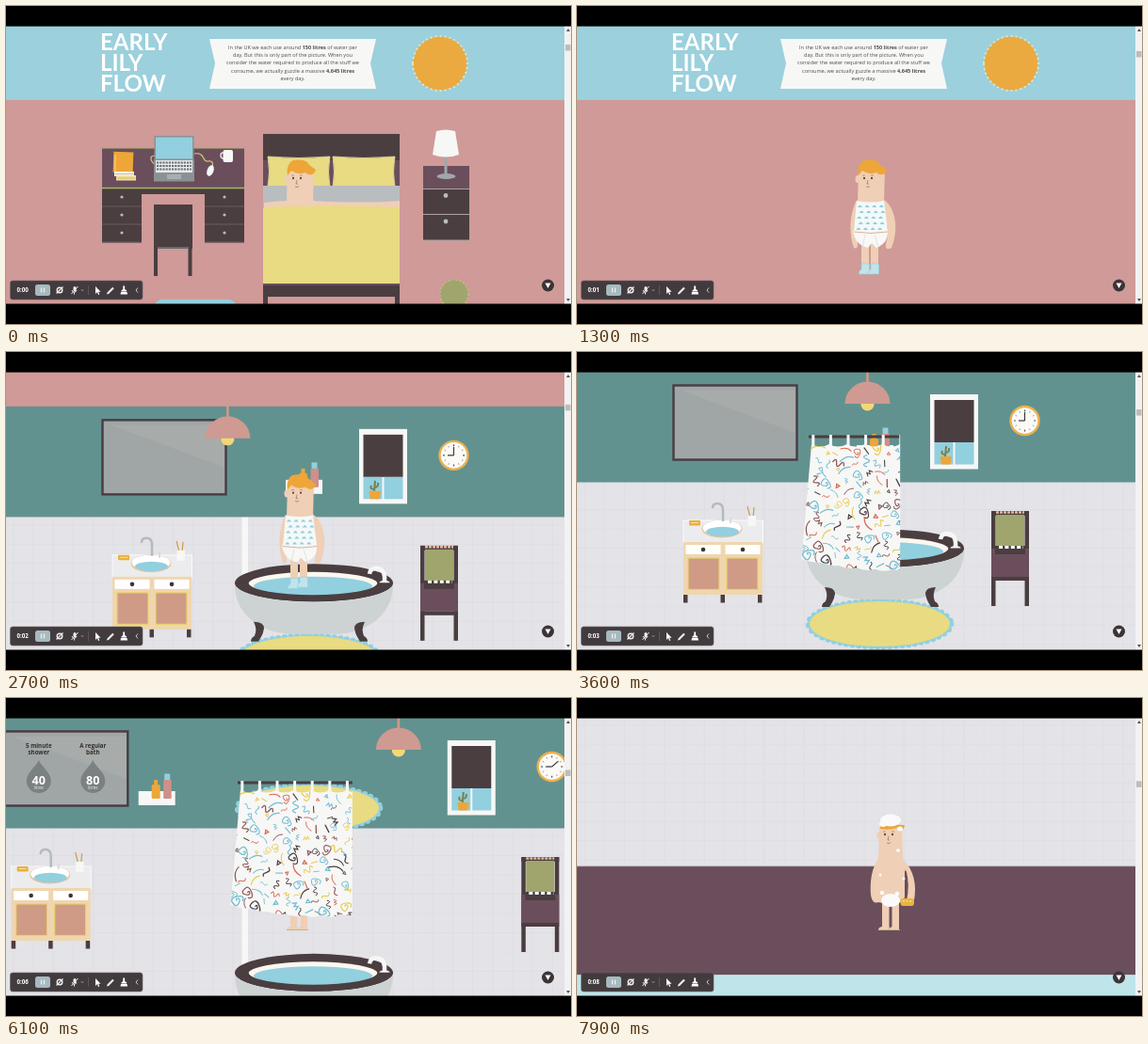
Write an HTML page that moves like this. It is 600 px wide and 338 px high and loops after 8000 ms.

```html
<!DOCTYPE html>
<html lang="en">
<head>
<meta charset="utf-8">
<title>Water story scroll</title>
<style>
html, body { margin: 0; width: 100%; height: 100%; overflow: hidden; background: #000; }
svg { display: block; width: 100vw; height: 100vh; }
text { font-family: "Open Sans", "Noto Sans", sans-serif; }
.logo { font: 700 24px Lato, sans-serif; fill: #fff; }
.mid { text-anchor: middle; }
.bold { font-weight: 700; }
</style>
</head>
<body>
<svg id="stage" viewBox="0 0 600 338" xmlns="http://www.w3.org/2000/svg"></svg>
<script>
const LOOP = 8000, ROOM = 296, SPEED = 0.19;
const C = {
  sky: '#9bd0dc', pink: '#cf9a98', teal: '#62928f', tile: '#e3e3e8', plum: '#6b4e5b', dark: '#4a3e40',
  yellow: '#e8db82', skin: '#efcfb5', hair: '#eda637', white: '#f7f7f6', grey: '#b9bdbf', green: '#a0a56d',
  blue: '#92cfdf', ice: '#bfe4ea', lime: '#a9b46a', peach: '#cf9b87', tub: '#cdd3d3'
};

const clamp = (v, lo, hi) => Math.max(lo, Math.min(hi, v));
const rect = (x, y, w, h, fill, more = '') =>
  `<rect x="${x}" y="${y}" width="${w}" height="${h}" fill="${fill}" ${more}/>`;
const oval = (x, y, rx, ry, fill, more = '') =>
  `<ellipse cx="${x}" cy="${y}" rx="${rx}" ry="${ry}" fill="${fill}" ${more}/>`;
const shape = (d, fill, more = '') => `<path d="${d}" fill="${fill}" ${more}/>`;
const line = (d, color, width = 1, more = '') =>
  `<path d="${d}" fill="none" stroke="${color}" stroke-width="${width}" ${more}/>`;
const text = (x, y, size, fill, str, cls = '') =>
  `<text x="${x}" y="${y}" font-size="${size}" fill="${fill}" class="${cls}">${str}</text>`;
const group = (id, ...parts) => `<g id="${id}">${parts.join('')}</g>`;
const room = (index, ...parts) => `<g transform="translate(0 ${index * ROOM})">${parts.join('')}</g>`;
const repeat = (n, fn) => Array.from({ length: n }, (_, i) => fn(i)).join('');

function seeded(seed) {
  return () => (seed = (seed * 16807) % 2147483647) / 2147483647;
}

// Bedroom
function header() {
  const copy = ['In the UK we each use around <tspan class="bold">150 litres</tspan> of water per',
    'day. But this is only part of the picture. When you',
    'consider the water required to produce all the stuff we',
    'consume, we actually guzzle a massive <tspan class="bold">4,645 litres</tspan>', 'every day.'];
  return rect(0, 20, 593, 80, C.sky) +
    ['EARLY', 'LILY', 'FLOW'].map((w, i) => `<text x="100" y="${47 + i * 22}" class="logo">${w}</text>`).join('') +
    shape('M216 35H393L387 61 393 88H216L222 61Z', C.white) +
    copy.map((s, i) => text(304.5, 46 + i * 8.2, 5.55, '#4d4d4d', s, 'mid')).join('') +
    oval(461, 61, 28.5, 28.5, '#eaaa40') +
    line('M432 61a29 29 0 1 0 58 0a29 29 0 1 0-58 0', '#f3e3b5', 1.8, 'stroke-dasharray="2 3"');
}

function drawers(x) {
  return rect(x, 195, 42, 56.5, C.dark) +
    [213, 232, 251].map(y => line(`M${x} ${y}h42`, '#74636a', 0.8)).join('') +
    [203, 222, 241].map(y => oval(x + 21, y, 1.6, 1.6, C.grey)).join('');
}

function desk() {
  return group('desk',
    rect(102, 151, 151, 42, C.plum), line('M102 151H253', C.lime, 1.2),
    rect(102, 193, 151, 7, C.dark), line('M102 193.5H253', C.lime, 1.5),
    drawers(102), drawers(211),
    rect(157, 211, 41, 47, C.dark), rect(157, 250, 4, 37, C.dark), rect(193.5, 250, 4, 37, C.dark),
    line('M161 257H194', '#8fb3ba', 0.8),
    rect(114, 155, 21, 22, C.hair, 'transform="rotate(2 124 166)"'), line('M116 158v18', '#f5d58b', 1),
    rect(115, 176, 21, 5, C.white), rect(117, 180, 21, 5.5, '#f0dfa0'), line('M116 178.5h20M118 183h19', '#c9a44b', 0.7),
    rect(157.5, 138, 42, 26, '#8b9296'), rect(159, 139.5, 39, 23, C.blue),
    rect(157, 163, 43, 23.5, '#8b9296'), rect(159, 164, 39, 13, '#e7e9ea'),
    line('M160 166.5h37M160 170h37M160 173.5h37', '#667075', 2, 'stroke-dasharray="2.2 1"'),
    rect(171, 179, 15, 5, '#a8afb2'),
    line('M200 157c12-2 8 9 14 8s6 2 5 6M158 159c-8 0-2 9-1 8', '#d8c877', 1.2),
    oval(217, 175, 3.4, 6, C.white, 'transform="rotate(20 217 175)"'),
    rect(230.5, 153, 10.5, 13, C.white, 'rx="2"'), line('M231 156c-4-1-4 6 0 6', C.white, 1.3),
    shape('M158 317q4-6 10-5h68q5 0 8 5z', C.blue));
}

function nightstand() {
  return group('stand',
    rect(443, 170, 49, 24, C.plum), rect(443, 194, 49, 55, C.dark),
    line('M443 194.5h49M443 221.5h49M443 249h49', '#a9a3a5', 1.2),
    oval(467, 201.5, 2.4, 2.4, C.grey), oval(467, 229, 2.4, 2.4, C.grey),
    rect(465.5, 158, 3, 22, '#a0a7ab'), oval(467.5, 181, 10, 3, '#a0a7ab'),
    shape('M457 133q10-3 20 0l4 25q-14 5-28 0z', C.white),
    oval(476, 306, 15, 15, C.green, 'stroke="#c4bf8c" stroke-width="1.3" stroke-dasharray="2 2"'));
}

const bedBack = () => group('bedBack',
  rect(273, 136, 145, 57, C.plum), rect(273, 136, 145, 28, C.dark),
  [278, 347].map(x => shape(`M${x} 160q33 3 66 0q-3 16 0 32q-33 2-66 0q3-16 0-32`, C.yellow,
    'stroke="#f0e9b5" stroke-width=".7"')).join(''),
  rect(273, 191, 145, 22, C.grey));

const bedFront = () => group('bedFront',
  shape('M274 209q25-3 50-2q60 3 94 0v9H274z', C.skin),
  shape('M273 214q70-3 145 0v82H273z', C.yellow),
  rect(273, 295, 145, 3, C.plum), rect(273, 297, 145, 12, C.dark),
  rect(273, 309, 5, 12, C.dark), rect(413, 309, 5, 12, C.dark));

// Bathroom
function mirror() {
  const drop = (x, n) => shape(`M${x} 66c2 6 13 13 13 22a13 13 0 0 1-26 0c0-9 11-16 13-22`, '#7b8183') +
    text(x, 91.5, 12.6, '#fff', n, 'mid bold') + text(x, 97, 4.6, '#eee', 'litres', 'mid');
  const label = (x, a, b) => text(x, 53, 6.2, '#33302f', a, 'mid bold') + text(x, 60, 6.2, '#33302f', b, 'mid bold');
  return group('mirror',
    rect(102.5, 35.5, 131, 79, '#a0a6a6', 'stroke="#493b44" stroke-width="2.4"'),
    shape('M112 41H232V86Z', '#a7abaa'),
    group('facts', label(139, '5 minute', 'shower'), label(196.5, 'A regular', 'bath'), drop(139, 40), drop(196.5, 80)));
}

const shelf = () => group('shelf',
  rect(297, 99, 39, 15, C.white),
  rect(311, 92, 9, 15, C.hair, 'rx="1.5"'), rect(313.5, 87, 4, 6, C.hair),
  rect(323.5, 87, 8.5, 20, '#cf8f8a', 'rx="1"'), rect(324.5, 80.5, 6, 6.5, C.blue));

const lamp = () => group('lamp',
  rect(-1.3, 20, 2.6, 15, C.peach), oval(0, 56, 7, 6.5, '#f3d777'),
  shape('M-24 55a24 23.5 0 0 1 48 0z', '#cf9a92'));

const windowPane = () => group('pane',
  rect(375, 45, 51, 79.5, C.white), rect(379.5, 51, 42, 45, C.dark),
  rect(379.5, 96, 20, 23.5, C.blue), rect(401.5, 96, 20, 23.5, C.blue),
  line('M391 111l1-11M391 107q5 0 4-5M391 109q-5 0-3-4', '#77804f', 2),
  shape('M385.5 111h12.5l-1.5 8.5h-9.5z', C.hair));

const clock = () => group('clock',
  oval(475.5, 73, 15, 15, '#fbfaf6', 'stroke="#edb04e" stroke-width="2.4"'),
  repeat(12, i => `<path d="M475.5 61.5v1.8" stroke="#444" stroke-width="${i % 3 ? 0.5 : 1.2}" transform="rotate(${i * 30} 475.5 73)"/>`),
  line('M475.5 73H469', '#333', 1.2), line('M475.5 73V64', '#333', 1.1, 'id="minute"'));

const sink = () => group('sink',
  rect(113, 179, 84.5, 24, '#ececef', 'stroke="#fafafa" stroke-width="1"'),
  oval(154, 188, 21.5, 9.5, '#e6c69d'), oval(154, 187, 20.5, 8.2, '#fff'), oval(154.5, 191, 17.5, 5.2, C.blue),
  line('M155 180V168q0-7-6-7-5 0-5 5', '#b3bbc0', 2.5), line('M163 176v6', '#d7dcdf', 2),
  rect(119, 179, 12, 5.5, '#e9b13f', 'rx="1"'), line('M121 181.5h8', '#fbe6a8', 0.9),
  line('M184 176l-3-12M187 176l1-11', '#d29c45', 1.2), rect(181.5, 174, 8.5, 11, C.white),
  rect(113, 202, 84, 56, '#f0d6ae'),
  [115.5, 157.5].map(x => rect(x, 205, 37, 10, '#fff') + oval(x + 18.5, 210, 2.3, 2.3, '#3c3435')).join(''),
  [118, 159].map(x => rect(x, 219, 33, 33.5, C.peach, 'stroke="#e8d36f" stroke-width="1.2"')).join(''),
  [113, 152.5, 192].map(x => rect(x, 258, 4.5, 8.5, C.dark)).join(''));

const chair = () => group('chair',
  rect(440, 169, 40, 5, C.dark), rect(440, 169, 4.5, 101, C.dark), rect(475.5, 169, 4.5, 101, C.dark),
  line('M445 170.5h30', '#e2b7a0', 2.5, 'stroke-dasharray="3 1"'), rect(445, 173, 30, 34, C.green),
  rect(440, 209, 40, 30, C.plum), rect(444, 206, 32, 9, C.dark),
  line('M448 207.5h26', '#fff', 3, 'stroke-dasharray="4 2.4"'), rect(440, 239, 40, 4, C.dark));

const rug = () => group('rug',
  oval(321.5, 289, 75.5, 24, C.yellow, `stroke="${C.blue}" stroke-width="6.5" stroke-dasharray="0 6.6" stroke-linecap="round"`),
  oval(321.5, 289, 74.5, 24, C.yellow));

const tubBack = () => group('tubBack',
  rect(250.5, 139, 6.5, 66, C.white), oval(254, 203, 5, 3, C.white),
  oval(327, 208.5, 84, 20, C.dark), oval(326, 209.5, 68.5, 12.5, '#fbf7ef'), oval(326, 212, 63, 10, C.blue),
  line('M402 208V202q-1-9-9-9-6 0-7 6', C.white, 4.5), oval(402, 208.5, 5.5, 2.5, C.white));

const tubFront = () => group('tubFront',
  shape('M243 209A84 20 0 0 0 411 209C412 244 380 263 350 263H304C274 263 242 244 243 209', C.tub),
  shape('M243 208.5A84 20 0 0 0 411 208.5H394.5A68.5 13 0 0 1 257.5 208.5Z', C.dark),
  shape('M263 250q11 0 11 7-1 6-3 9l-3 5h-8q0-4 4-6 3-7-1-15z', C.dark),
  shape('M381 250q-11 0-11 7 1 6 3 9l3 5h8q0-4-4-6-3-7 1-15z', C.dark));

function curtain() {
  const rnd = seeded(4711), colors = ['#4a3e40', '#74bdd2', '#e6cc55', '#d8694f', '#8b5a58', '#74bdd2'];
  const marks = ['M-5 1q2-6 4 0t4 0 4 0', 'M-6 4Q-2-5 6-5', 'M0 0q2-2 2 1t-5 1 0-6 7 4-4 6',
    'M-4 2l2-4 2 4 2-4 2 4', 'M-5-2c4-4 5 8 10 2', 'M-4 0h8', 'M-2-2l2 4 2-4z'];
  const pattern = repeat(17 * 12, i => {
    const x = 240 + (i % 17) * 10.8 + rnd() * 7, y = 102 + Math.floor(i / 17) * 11.3 + rnd() * 7;
    const d = marks[Math.floor(rnd() * marks.length)], color = colors[Math.floor(rnd() * colors.length)];
    const pose = `translate(${x.toFixed(1)} ${y.toFixed(1)}) rotate(${Math.round(rnd() * 180 - 90)}) scale(${(0.65 + rnd() * 0.4).toFixed(2)})`;
    return line(d, color, 1.25, `transform="${pose}" stroke-linecap="round"`);
  });
  const hem = repeat(9, i => {
    const x = 414 - (i + 1) * 19.5, y = 220 + 11 * Math.sin(Math.PI * (i + 1) / 9);
    return `Q${x + 10} ${(y + 4).toFixed(1)} ${x} ${y.toFixed(1)}`;
  });
  const cloth = 'M249 98' + repeat(8, () => 'q9.4 5 18.8 0') + 'L405 120L414 220' + hem + 'Z';
  return `<clipPath id="cloth"><path d="${cloth}"/></clipPath><g clip-path="url(#opening)">` +
    shape(cloth, C.white) + `<g clip-path="url(#cloth)">${pattern}</g>` +
    rect(246, 88.5, 157, 3, C.dark) + repeat(9, i => rect(249.3 + i * 18.6, 88, 3, 12, C.white)) + '</g>';
}

function tiles() {
  const grid = repeat(28, i => `M${8 + i * 21.2} 139V317`) + repeat(9, i => `M0 ${147 + i * 20.5}H593`);
  return rect(0, 138.5, 593, 178.5, C.tile) + line(grid, '#dddde2', 0.8);
}

// Character
const face = (x, y) => oval(x - 4, y, 0.9, 1.2, '#3d3433') + oval(x + 4, y, 0.9, 1.2, '#3d3433') +
  line(`M${x - 6} ${y - 3}h3M${x + 3} ${y - 3}h3`, '#c98c3b', 0.8) +
  line(`M${x} ${y + 2}l-1 4h2M${x - 2} ${y + 9}q2 1.5 4-.5`, '#a97763', 0.8);

function dressed() {
  const leg = (id, x) => group(id, rect(x, 250, 8, 28, C.skin),
    shape(`M${x} 274h8.5v11h-11q-1-3 2.5-5z`, C.ice, 'stroke="#93cfdd" stroke-width=".6"'));
  return group('dressed',
    leg('legA', 302), leg('legB', 312),
    shape('M297 206C290 220 288 240 294 257q4 2 4-4V210zM326 206C340 216 341 240 334 257q-7 4-6-4 5-14-2-30z', C.skin),
    shape('M299 173q14-8 28 0l-1 36h-28z', C.skin), oval(298, 184, 2.5, 4, C.skin),
    shape('M293 239h37q1 13-12 18l-5-5-4 5q-14-3-16-18', '#f8f8f7'), line('M303 256l3-13M320 256l-4-13', '#d5d8d8', 0.7),
    shape('M297 207q15 3 29 0l4 32q-18 4-36 1z', '#f5f8f8'),
    repeat(20, i => {
      const row = Math.floor(i / 4);
      return shape(`M${298 + (i % 4) * 7.6 + (row % 2) * 2 - row * 0.4} ${214 + row * 6}q2.5-5 5 0z`, C.blue);
    }),
    line('M294 240q18 3 36 0', '#dfb08f', 1),
    face(309, 183),
    shape('M299 180c-1-6 0-11 4-15 5-2 12-2 17 1l2 3 7 5-2 4q-5 3-9-1-8 3-15-2z', C.hair));
}

const washed = () => group('washed',
  rect(324, 212, 7.5, 34, C.skin), rect(334.5, 212, 7.5, 34, C.skin),
  shape('M320 247q0-4 5-4h6.5v4zM331.5 247q0-4 5-4h5.5v4z', C.skin), line('M320 246.5h23', '#b9bf7c', 1),
  shape('M321 136q12-5 24 0l1 35c12 12 15 28 12 44q-4 5-8 1 4-18-2-34v34q-14 5-28 1-10 4-8-22 1-14 8-24z', C.skin),
  line('M349 184q4 16-1 30', C.plum, 1.5),
  oval(320.5, 146, 2, 3.5, C.skin), face(331, 145),
  shape('M322 134l26 1-1 4q-4 2-7-1-9 3-18 1z', C.hair),
  oval(333, 130, 11, 6.5, '#fafafa'), oval(325, 134, 4, 3, '#fafafa'), oval(343, 139, 3, 2.5, '#fafafa'),
  oval(333, 215, 10, 7, '#fafafa'), oval(324, 207, 2.4, 2.2, '#fafafa'), oval(340, 208, 2.4, 2.2, '#fafafa'),
  oval(341, 162, 2, 1.8, '#fafafa'), oval(322, 188, 1.5, 1.5, '#fafafa'), oval(347, 192, 1.5, 1.5, '#fafafa'),
  rect(343.5, 213, 14.5, 8, '#e8b53f', 'rx="3"'), line('M346 216h9', '#f7dd8d', 1.5, 'stroke-dasharray="2 1.5"'));

// Fixed controls
function controls() {
  const icon = (d, w = 1.3) => line(d, '#eee', w);
  return rect(593, 20, 7, 298, '#f2f2f2') + shape('M595 27l2-3 2 3zM595 311l2 3 2-3z', '#555') +
    rect(594, 41, 5.5, 6.5, '#bcbcbc', 'id="thumb"') +
    oval(575.5, 297, 6.5, 6.5, '#3a3436') + shape('M572.5 294.5h6l-3 5.5z', '#fff') +
    rect(4.5, 292, 140.5, 20, '#423b3e', 'rx="2.5" stroke="#665d61" stroke-width=".6"') +
    '<text id="timer" x="11.5" y="304.3" font-size="6.2" fill="#fff" class="bold"></text>' +
    rect(31, 296, 16, 12, '#a6bac0', 'rx="2.5"') + icon('M37.5 299.5v5M40.5 299.5v5') +
    oval(57, 302, 2.8, 2.8, 'none', 'stroke="#eee" stroke-width="1.4"') + icon('M53.5 305.5l7-7') +
    rect(71.5, 298, 3, 5.5, '#eee', 'rx="1.5"') +
    icon('M70 302q2.5 5 5 0M72.5 304.5v2M69.5 306l7-8', 1) + icon('M80 301.5l1 1 1-1', 0.7) + line('M87.5 297v10', '#655d60', 0.8) +
    shape('M95 298v8l2-2 1 3 1.3-.6-1.2-2.7h2.5z', '#fff') +
    icon('M108.5 305l5.5-5.5', 2.2) + shape('M107 306.5l.8-2.5 1.7 1.7z', '#fff') +
    shape('M124.3 297.5h1.8v3.5l2 1.2v1.2h-5.6v-1.2l1.8-1.2zM122 304h6.5l.5 2.5h-7.5z', '#fff') + icon('M140 299.5l-2 2.5 2 2.5', 0.8);
}

document.getElementById('stage').innerHTML =
  `<clipPath id="view"><rect y="21" width="593" height="296"/></clipPath>
   <clipPath id="opening"><rect id="openingBox" x="230" y="80" height="160"/></clipPath>` +
  rect(0, 0, 600, 338, '#000') + '<g clip-path="url(#view)">' +
  group('back',
    room(0, rect(0, 20, 593, 298, C.pink), header(), desk(), nightstand(), bedBack()),
    room(1, rect(0, 21, 593, 118, C.teal), tiles(), mirror(), shelf(), lamp(), windowPane(), clock(), sink(), chair(), rug(), tubBack()),
    room(2, rect(0, 21, 593, 117, C.plum), rect(0, 137, 593, 180, C.ice), line('M0 21.5H593', '#eee', 0.8))) +
  group('person', dressed(), washed()) +
  group('front', room(0, bedFront()), room(1, tubFront(), curtain())) + '</g>' +
  controls() + rect(0, 0, 600, 21.6, '#000') + rect(0, 316.5, 600, 22, '#000');

const el = {};
document.querySelectorAll('[id]').forEach(node => { el[node.id] = node; });
const move = (id, x, y = 0) => el[id].setAttribute('transform', `translate(${x.toFixed(2)} ${y.toFixed(2)})`);

function render(t) {
  const scroll = clamp(SPEED * (t - 1337), 0, ROOM) + SPEED * Math.max(0, t - 7170);
  move('back', 0, -scroll);
  move('front', 0, -scroll);

  // Furniture parts to clear the bedroom
  const leave = 2.3e-4 * Math.max(0, t - 250) ** 2;
  move('desk', -leave);
  move('stand', leave);
  move('bedBack', 0, leave * 0.72);
  move('bedFront', 0, leave * 0.72);

  // Bathroom pieces drift apart after the shower
  const part = 0.2 * Math.max(0, t - 5580);
  move('mirror', -part);
  move('sink', -part * 1.03);
  move('shelf', -part * 1.5);
  move('lamp', Math.min(308.5, 14.5 + 0.3675 * (t - 2100)) + part * 1.04);
  move('pane', part * 0.9);
  move('clock', part);
  move('chair', part * 1.03);
  move('rug', 0, -part * 1.65);
  move('tubBack', 0, part * 0.8);
  move('tubFront', 0, part * 0.8);
  const edge = Math.min(416, 246 + 0.138 * (t - 2897), 416 - 0.14 * (t - 5757));
  el.openingBox.setAttribute('width', Math.max(0, edge - 230));
  el.facts.setAttribute('opacity', clamp((t - 3900) / 400, 0, 1));
  el.minute.setAttribute('transform', `rotate(${clamp((t - 4000) * 0.0233, 0, 60)} 475.5 73)`);

  const clean = t > 4200;
  el.dressed.style.display = clean ? 'none' : '';
  el.washed.style.display = clean ? '' : 'none';
  if (clean) move('person', -22 * (1 - clamp((t - 6200) / 1000, 0, 1)));
  else move('person', 0, -clamp((t - 1337) * 0.0245, 0, 40));
  const step = t > 1337 ? Math.sin((t - 1337) / 120) * 1.5 : 0;
  move('legA', 0, -Math.max(0, step));
  move('legB', 0, -Math.max(0, -step));

  el.thumb.setAttribute('y', 41 + 0.0052 * t + 1e-7 * t * t);
  el.timer.textContent = '0:0' + Math.floor((t + 200) / 1000);
}

const start = performance.now();
function tick() {
  render((performance.now() - start) % LOOP);
  requestAnimationFrame(tick);
}
tick();
</script>
</body>
</html>
```
